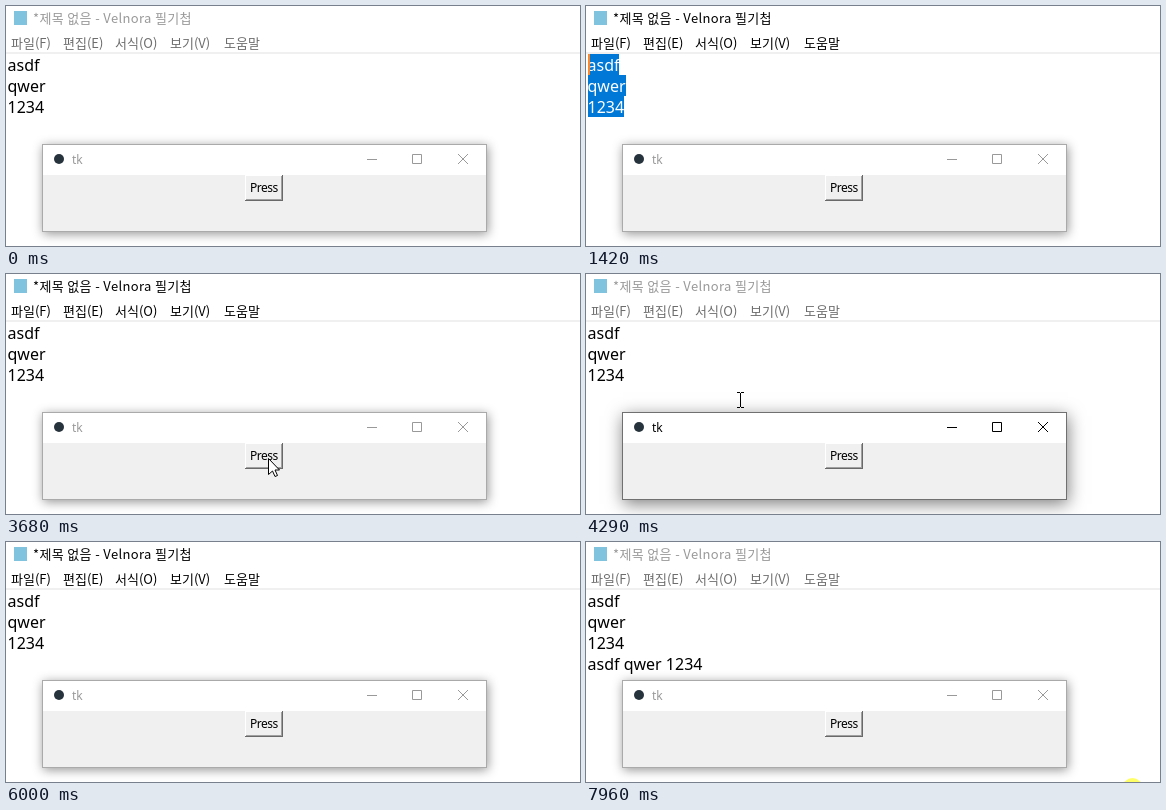
Recreate the animation shown at these times as an HTML page with a canvas. Size 574x240 px, loop 8.03 s.

```html
<!DOCTYPE html>
<html lang="ko">
<head>
<meta charset="utf-8">
<title>Text selection and tk window</title>
<style>
html, body { margin: 0; width: 100%; height: 100%; overflow: hidden; background: #fff; }
canvas { display: block; }
</style>
</head>
<body>
<canvas id="stage" width="574" height="240"></canvas>
<script>
const ctx = document.getElementById('stage').getContext('2d');
const LOOP = 8030, STEP = 77, BLINK = 530, PRESS = 80;
const KOREAN = '13px "Noto Sans CJK KR", "Noto Sans CJK", sans-serif';
const LATIN = '"Noto Sans", "Open Sans", sans-serif';
const BODY = '16px ' + LATIN;
const LEFT = 1.5, TOP = 48, ROW = 21;
const WIN = { x: 36, y: 138, w: 445, h: 88 };

const WORDS = ['asdf', 'qwer', '1234'];
const SELECT = 1340, NEWLINE = 5470, PASTE = 6230;
const KEYS = [SELECT, NEWLINE, PASTE];
const CLICKS = [1184, 2900, 3830, 4690, 7960];

// Each move starts where the one before ended
const START = { x: 390, y: 243 };
const MOVES = [
  { from: 500, to: 1116, x: 47, y: 103 },
  { from: 1890, to: 2120, x: 56, y: 110 },
  { from: 2350, to: 2580, x: 75, y: 113 },
  { from: 3220, to: 3680, x: 262, y: 184 },
  { from: 4060, to: 4290, x: 154, y: 126 },
  { from: 4370, to: 4600, x: 142, y: 111 },
  { from: 6940, to: 7560, x: 456, y: 250 },
  { from: 7640, to: 7870, x: 546, y: 246 }
];

const smooth = p => p * p * (3 - 2 * p);
const last = (times, t) => Math.max(-1, ...times.filter(time => time <= t));

function rect(x, y, w, h, color) {
  ctx.fillStyle = color;
  ctx.fillRect(x, y, w, h);
}

function disc(x, y, r, color) {
  ctx.fillStyle = color;
  ctx.beginPath();
  ctx.arc(x, y, r, 0, Math.PI * 2);
  ctx.fill();
}

function text(str, x, y, font, color, spacing = 0) {
  ctx.font = font;
  ctx.fillStyle = color;
  ctx.letterSpacing = spacing + 'px';
  ctx.fillText(str, x, y);
}

function endOf(line) {
  ctx.font = BODY;
  ctx.letterSpacing = '0px';
  return Math.round(LEFT + ctx.measureText(line).width);
}

function pointerAt(t) {
  let { x, y } = START;
  for (const move of MOVES) {
    if (t < move.from) break;
    const steps = Math.round((move.to - move.from) / STEP) + 1;
    const done = Math.floor((t - move.from) / STEP + 0.1) + 1;
    const p = smooth(Math.min(1, done / steps));
    x += (move.x - x) * p;
    y += (move.y - y) * p;
  }
  return { x: Math.round(x), y: Math.round(y) };
}

function areaAt({ x, y }) {
  const inWindow = x >= WIN.x && x < WIN.x + WIN.w && y >= WIN.y && y < WIN.y + WIN.h;
  if (inWindow) return 'window';
  return y >= TOP && y < 240 ? 'editor' : 'outside';
}

function focusAt(t) {
  const click = last(CLICKS, t);
  return click < 0 ? 'outside' : areaAt(pointerAt(click));
}

function drawCaret(t, lines, selected) {
  const reset = last([...CLICKS, ...KEYS], t);
  if (Math.floor((t - reset) / BLINK) % 2) return;
  const row = selected ? 0 : lines.length - 1;
  const x = selected ? 2 : endOf(lines[row]);
  rect(x, TOP + ROW * row, 2, ROW, selected ? '#ff8728' : '#000');
}

function drawEditor(t) {
  const active = focusAt(t) === 'editor';
  rect(8, 5, 13, 14, '#7fc3df');
  text('*제목 없음 - Velnora 필기첩', 27, 17, KOREAN, active ? '#000' : '#999', 0.35);
  const menu = { '파일(F)': 5, '편집(E)': 57, '서식(O)': 109, '보기(V)': 164, '도움말': 218 };
  for (const label in menu) text(label, menu[label], 42, KOREAN, active ? '#000' : '#6d6d6d');
  rect(0, 46, 574, 2, '#f0f0f0');

  const lines = [...WORDS];
  if (t >= NEWLINE) lines.push(t >= PASTE ? WORDS.join(' ') : '');
  const selected = last([...CLICKS, ...KEYS], t) === SELECT;
  lines.forEach((line, i) => {
    const y = TOP + ROW * i;
    if (selected) rect(2, y, endOf(line) - 2, ROW, '#0078d7');
    text(line, LEFT, y + 17, BODY, selected ? '#fff' : '#000');
  });
  if (active) drawCaret(t, lines, selected);
}

function drawButton(down) {
  const light = '#fff', dark = '#696969';
  rect(239, 169, 38, 26, down ? light : dark);
  rect(239, 169, 37, 25, down ? dark : light);
  rect(240, 170, 36, 24, down ? '#e3e3e3' : '#a0a0a0');
  rect(240, 170, 35, 23, '#f0f0f0');
  const shift = down ? 1 : 0;
  text('Press', 244 + shift, 186 + shift, '12px ' + LATIN, '#000', -0.5);
}

function drawWindow(t) {
  const { x, y, w, h } = WIN;
  const active = focusAt(t) === 'window';
  ctx.save();
  ctx.shadowColor = `rgba(0,0,0,${active ? 0.5 : 0.42})`;
  ctx.shadowBlur = active ? 16 : 10;
  ctx.shadowOffsetX = 1;
  ctx.shadowOffsetY = active ? 4 : 2;
  rect(x, y, w, h, active ? '#707070' : '#aaa');
  ctx.restore();
  rect(x + 1, y + 1, w - 2, 30, '#fff');
  rect(x + 1, y + 31, w - 2, h - 32, '#f0f0f0');

  disc(53, 153, 5, '#26323c');
  text('tk', 66, 158, '12px ' + LATIN, active ? '#000' : '#999');

  ctx.strokeStyle = active ? '#000' : '#999';
  ctx.lineWidth = 1;
  ctx.beginPath();
  ctx.moveTo(361, 153.5);
  ctx.lineTo(371, 153.5);
  ctx.rect(406.5, 148.5, 9, 9);
  ctx.moveTo(452, 148);
  ctx.lineTo(462, 158);
  ctx.moveTo(462, 148);
  ctx.lineTo(452, 158);
  ctx.stroke();

  drawButton(active && t - last(CLICKS, t) < PRESS);
}

function drawArrow(x, y) {
  const outline = [[0, 0], [0, 16], [4, 12.5], [6.5, 18], [9, 17], [6.5, 11.5], [11, 11.5]];
  ctx.beginPath();
  for (const [dx, dy] of outline) ctx.lineTo(x + dx + 0.5, y + dy + 0.5);
  ctx.closePath();
  ctx.fillStyle = '#fff';
  ctx.fill();
  ctx.strokeStyle = '#000';
  ctx.lineWidth = 1;
  ctx.stroke();
}

function drawBeam(x, y) {
  for (const end of [y - 8, y + 7]) {
    rect(x - 3, end, 3, 1, '#000');
    rect(x + 1, end, 3, 1, '#000');
  }
  rect(x, y - 7, 1, 14, '#000');
}

function drawPointer(t) {
  const spot = pointerAt(t);
  const click = last(CLICKS, t);
  if (click >= 0 && t - click < PRESS) disc(spot.x + 0.5, spot.y, 10, 'rgba(255,255,0,.6)');

  // A key press hides the pointer until it moves again
  const moved = last(MOVES.map(move => move.from), t);
  if (moved < last(KEYS, t - PRESS)) return;
  (areaAt(spot) === 'editor' ? drawBeam : drawArrow)(spot.x, spot.y);
}

function draw(now) {
  const t = now % LOOP;
  rect(0, 0, 574, 240, '#fff');
  drawEditor(t);
  drawWindow(t);
  drawPointer(t);
  requestAnimationFrame(draw);
}
requestAnimationFrame(draw);
</script>
</body>
</html>
```
